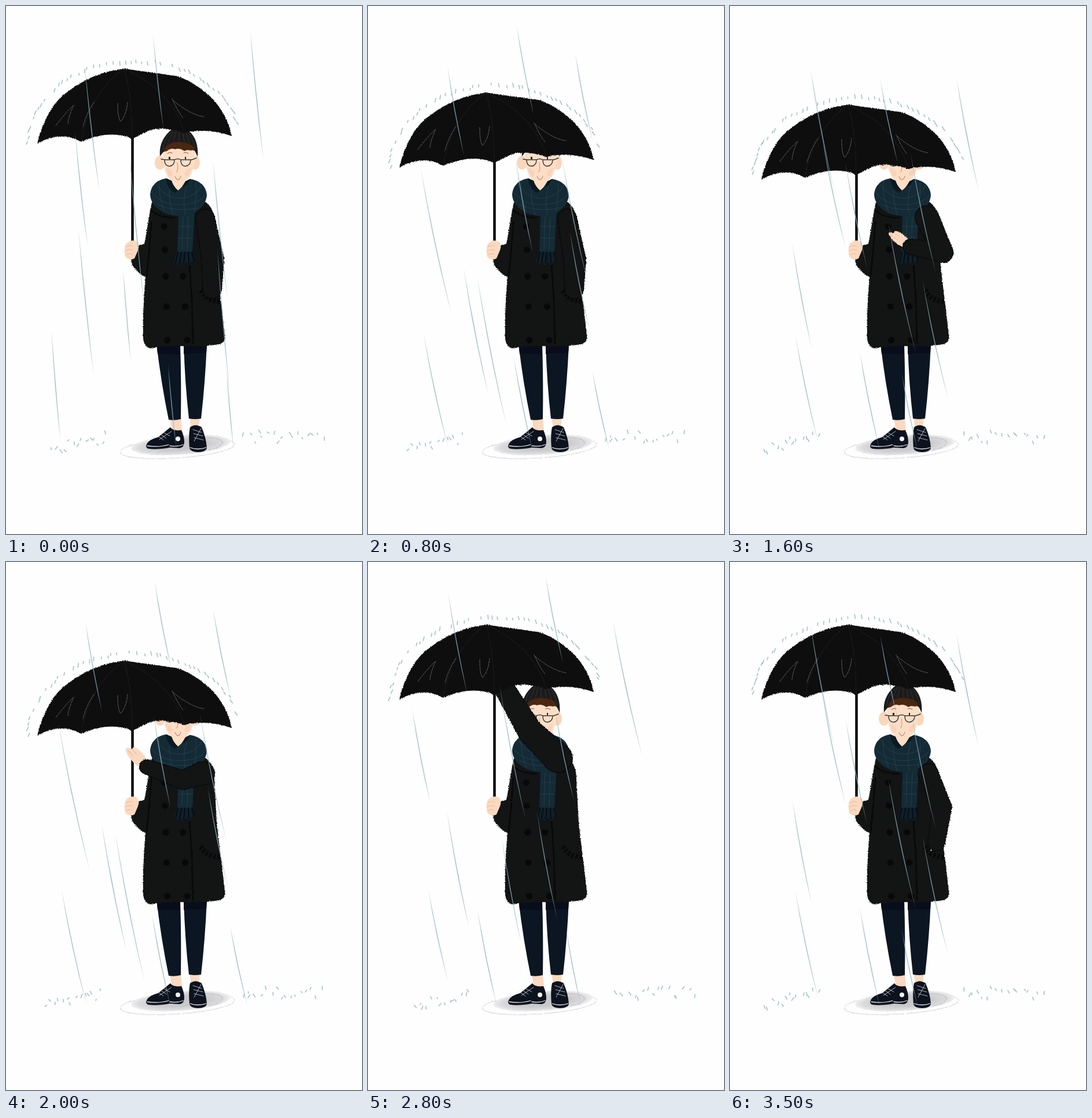
Animation of 615x910 px, one loop 3600 ms. Source, as an HTML page:

```html
<!DOCTYPE html>
<html lang="en">
<head>
<meta charset="utf-8">
<title>Umbrella in the rain</title>
<style>
html, body { margin: 0; width: 100%; height: 100%; overflow: hidden; background: #fefefe; }
svg { display: block; width: 100vw; height: 100vh; }
</style>
</head>
<body>
<svg viewBox="0 0 615 910" fill="none" stroke-linecap="round" stroke-linejoin="round">
  <defs>
    <filter id="rough" filterUnits="userSpaceOnUse" x="0" y="0" width="615" height="910" color-interpolation-filters="sRGB">
      <feTurbulence type="fractalNoise" baseFrequency=".5" numOctaves="2" seed="4"/>
      <feDisplacementMap in="SourceGraphic" scale="3" xChannelSelector="R" yChannelSelector="G"/>
      <feGaussianBlur stdDeviation=".5"/>
    </filter>
    <radialGradient id="wet">
      <stop offset=".5" stop-color="#c9c8ca"/>
      <stop offset=".85" stop-color="#dcdbdd"/>
      <stop offset="1" stop-color="#f0f0f1"/>
    </radialGradient>
  </defs>

  <g id="puddle" filter="url(#rough)">
    <g transform="rotate(-4 296 760)">
      <ellipse cx="296" cy="762" rx="99" ry="17" stroke="#dadadc" stroke-width="1.2"/>
      <ellipse cx="302" cy="757" rx="86" ry="17" fill="url(#wet)"/>
    </g>
    <path d="M345 744Q374 744 374 753Q372 762 350 765" stroke="#bebdc0"/>
  </g>

  <g id="legs">
    <path fill="#fad9c0" d="M282 708H302L304 732H287ZM317 708H335L333 729H320Z"/>
    <path fill="#0b1622" d="M260 582H301Q303 650 302 712Q291 715 281 713Q268 650 260 582ZM307 582H347Q344 650 337 711Q327 713 316 711Q309 650 307 582Z"/>
    <path fill="#090d1b" d="M260 582H301V601Q282 598 262 600ZM307 582H347L346 599Q327 597 307 600Z"/>
  </g>

  <g id="shoes">
    <path fill="#0c131e" d="M242 758Q244 748 263 743L284 726Q288 733 303 731Q308 742 308 751Q308 761 300 762L283 761Q262 765 246 763Q242 762 242 758Z"/>
    <path fill="#0c131e" d="M317 762Q315 740 318 726Q327 719 338 726Q346 745 347 762Q345 769 332 769Q319 769 317 762Z"/>
    <path stroke="#e4e5e6" stroke-width="1.3" d="M244 758Q265 761 281 756M283 758Q296 760 306 756M318 761Q331 766 346 761"/>
    <path stroke="#b9bfc4" stroke-width=".9" d="M262 741L272 748M267 738L277 745M272 735L283 741M265 747L286 733M323 730L338 735M324 737L340 741M325 744L341 748M337 728L325 750"/>
    <circle cx="297" cy="746" r="4" fill="#f4f4f4"/>
  </g>

  <path d="M218.500 215V432" stroke="#0f0f0f" stroke-width="4.600"/>

  <g id="head">
    <ellipse cx="266" cy="270" rx="9" ry="12" fill="#fad6bb"/>
    <ellipse cx="327" cy="270" rx="8" ry="12" fill="#fad6bb"/>
    <path fill="#fcdec6" d="M271 240H327Q328 270 322 284Q318 296 312 300V320H285V301Q277 294 274 280Q270 260 271 240Z"/>
    <path fill="#f8cbb0" opacity=".6" d="M276 279Q287 281 288 290Q285 296 281 293ZM320 279Q310 281 308 290Q313 296 316 291Z"/>
    <path fill="#4b2611" d="M270 252Q272 230 300 231Q328 231 328 252Q325 247 319 249Q312 247 308 250Q300 244 292 247Q285 244 278 250Z"/>
    <path fill="#1b1b1c" d="M266 259C264 236 275 222 287 212H312C326 222 333 238 331 260L325 247Q325 236 298 234Q274 236 273 250Z"/>
    <path stroke="#3a3a3c" stroke-width=".8" d="M271 248Q272 232 284 218M279 238L289 216M289 234L294 215M299 233V214M308 234L305 215M317 237L310 216M327 246Q324 230 316 219"/>
    <path stroke="#39393a" stroke-width="1.400" d="M268 264L275 265H291Q297 262 302 265H321L329 262M274 265Q274 276 283 276Q291 275 291 265M302 265Q302 276 310 276Q319 275 319 265"/>
    <path stroke="#8a5b42" d="M279 254Q283 251 287 253M307 253Q311 251 315 254"/>
    <path stroke="#eaa67f" stroke-width="1.500" d="M296 270Q298 282 295 286"/>
    <path stroke="#d5826a" stroke-width="1.200" d="M292 294Q296 301 298 299Q301 298 302 293"/>
    <path fill="#222" d="M281 260h3v4h-3zM309 260h2v4h-2z"/>
  </g>

  <g id="coat" filter="url(#rough)">
    <path fill="#131414" d="M252 338C247 360 244 385 239 410L230 412L216 428Q214 444 224 454Q233 464 241 467C238 500 236 540 237 572Q238 588 250 590Q275 586 300 586Q340 588 368 583Q380 580 378 568C374 530 370 500 364 450L360 375Q360 348 345 338L320 332H260Z"/>
    <path stroke="#080809" stroke-width="2.500" d="M250 352Q268 366 291 365M251 372Q248 420 243 466M317 446L321 505L323 582"/>
    <path stroke="#08080a" stroke-width="9" stroke-dasharray="4 3" stroke-linecap="butt" d="M337 490Q347 508 369 509"/>
    <g id="buttons" fill="#08080a"></g>
  </g>

  <g id="scarf">
    <path fill="#101f29" d="M297 352H326L322 424L327 442L321 439L317 447L311 441L305 447L301 440L296 445L290 441L296 420Z"/>
    <path fill="#142b36" d="M299 352H326L322 424H296Z"/>
    <path stroke="#060b10" stroke-width="1.800" d="M297 424L293 442M303 424L300 441M309 424L307 443M315 424L316 443M321 424L325 441"/>
    <path fill="#142b36" d="M277 297L286 302Q290 312 297 318Q304 313 310 303L318 298Q345 303 347 326Q345 347 322 358Q298 366 274 357Q249 344 249 324Q252 301 277 297Z"/>
    <path fill="#0a1922" d="M277 297L286 301Q289 311 297 318L292 322Q277 314 277 297ZM318 298L310 302L304 312Q314 310 318 298Z"/>
    <path stroke="#36525b" stroke-width=".8" opacity=".6" d="M252 322Q270 345 308 342Q335 340 345 325M260 307Q276 333 304 331Q330 328 338 309M262 342Q290 356 332 348M265 302Q262 325 274 354M312 310Q304 335 310 360M328 305Q330 330 325 354M282 317Q282 340 289 360M306 364L304 420M315 363L313 420M299 380H323M298 400H322"/>
  </g>

  <g id="arm" filter="url(#rough)"></g>

  <path fill="#fad9c0" d="M207 410Q214 402 225 405Q232 411 228 421L222 435Q213 440 206 432Q203 420 207 410Z"/>
  <path stroke="#eab997" d="M207 415Q214 411 219 414M206 422Q213 418 219 421M207 429Q213 425 218 428"/>

  <g id="canopy">
    <g filter="url(#rough)">
      <path fill="#0e0e0e" d="M54 237C63 200 82 164 105 149Q150 114 204 108L297 121C345 140 380 175 390 224Q345 209 308 219Q265 204 240 218L218 229Q180 212 130 234Q95 214 54 237Z"/>
      <path stroke="#171818" stroke-width="1.500" d="M204 108Q145 150 130 232M204 108Q217 150 218 227M204 108Q285 145 308 217"/>
    </g>
    <path stroke="#62686a" stroke-width=".9" stroke-dasharray="5 1.500" d="M86 206Q106 180 117 171Q108 190 107 203M152 166Q139 185 133 208M193 168Q193 194 198 199Q208 188 210 166M287 160Q298 184 306 193M289 163Q318 187 342 191"/>
  </g>

  <g id="rain" fill="#8db2bd" opacity=".8"></g>
  <path id="drops" stroke="#a6c6cb" stroke-width="1.700"/>
</svg>
<script>
const STEP_MS = 100, STEPS = 36, SHOWERS = 6, GROUND = 765;
const $ = id => document.getElementById(id);
const mix = (a, b, k) => a + (b - a) * k;
const clamp = k => Math.max(0, Math.min(1, k));
const mixAll = (a, b, k) => a.map((v, i) => mix(v, b[i], k));

function seeded(seed) {
  return () => {
    seed = (seed * 16807 + 11) % 2147483647;
    return seed / 2147483647;
  };
}

// The canopy sinks slowly, then is pushed back up.
const slipAt = step => 62 * (step < 20 ? clamp(step / 12) : clamp((27 - step) / 4));

// Joints are shoulder, elbow and wrist; radii belong to them in turn.
const pose = (joints, radii, hand) => [...joints, ...radii, hand];
const rest = () => pose([344, 366, 357, 438, 356, 488], [17, 20, 17], 0);
const akimbo = () => pose([341, 364, 375, 408, 357, 478], [19, 15, 14], .45);
const sweep = () => pose([340, 364, 368, 425, 312, 415], [21, 18, 14], .9);
const grip = () => pose([340, 364, 306, 376, 243, 353], [21, 17, 13], 1);
const push = slip => pose(
  [328, 338 + .38 * slip, 280 - .13 * slip, 292 + .64 * slip, 238 - .25 * slip, 222 + 1.1 * slip],
  [26, 22, 18], .9);
const timeline = [
  [0, rest], [9, rest], [12, akimbo], [16, sweep], [20, grip], [24, push],
  [28, push], [31, grip], [33, sweep], [34, akimbo], [36, rest]
];

function armAt(step) {
  const next = timeline.findIndex(([at]) => at > step);
  const [t0, from] = timeline[next - 1], [t1, to] = timeline[next];
  const slip = slipAt(step);
  return mixAll(from(slip), to(slip), (step - t0) / (t1 - t0));
}

function limb(x1, y1, r1, x2, y2, r2) {
  const a = Math.atan2(y2 - y1, x2 - x1) + Math.PI / 2, c = Math.cos(a), s = Math.sin(a);
  return `<path d="M${x1 + c * r1} ${y1 + s * r1}L${x2 + c * r2} ${y2 + s * r2}L${x2 - c * r2} ${y2 - s * r2}L${x1 - c * r1} ${y1 - s * r1}Z"/>`
    + `<circle cx="${x1}" cy="${y1}" r="${r1}"/><circle cx="${x2}" cy="${y2}" r="${r2}"/>`;
}

function armMarkup(step) {
  const [sx, sy, ex, ey, wx, wy, sr, er, wr, show] = armAt(step);
  const sleeve = grow => limb(sx, sy, sr + grow, ex, ey, er + grow) + limb(ex, ey, er + grow, wx, wy, wr + grow);
  const turn = Math.atan2(wy - ey, wx - ex) + .44;
  const reach = wr * .6 + 20 * show;
  const x = wx + Math.cos(turn) * reach, y = wy + Math.sin(turn) * reach;
  return `<g transform="translate(${x} ${y}) rotate(${turn * 180 / Math.PI}) scale(${show} ${show * (.5 + show / 2)})">`
    + '<path fill="#fad9c0" d="M-20 -9Q-4 -13 10 -9Q20 -6 20 -2Q17 2 12 3Q15 8 8 10Q-6 13 -20 9Z"/>'
    + '<path stroke="#eab997" d="M0 -4L15 -3M-1 3L11 4"/></g>'
    + `<g fill="#0b0b0c">${sleeve(0)}</g><g fill="#131414">${sleeve(-1.5)}</g>`;
}

function streak(x, y, length, lean) {
  const x2 = x + length * lean, y2 = y + length;
  const cx = x + length * lean * .4, cy = y + length / 2;
  return `<path d="M${x} ${y}Q${cx + 1.5} ${cy} ${x2} ${y2}Q${cx - 1.5} ${cy} ${x} ${y}Z"/>`;
}

// Four staggered rows of three streaks; the second shower falls almost straight.
function rainMarkup(shower) {
  const random = seeded(shower * 977 + 131);
  const lean = shower === 1 ? .08 : .18;
  let markup = '';
  for (let row = 0; row < 4; row++) {
    for (let col = 0; col < 3; col++) {
      const x = mix(75, 400, (col + random() * .9) / 3) + (row ? 0 : 60);
      const y = 20 + row * 175 + random() * 110;
      const length = Math.min(140 + random() * 120, GROUND - y);
      markup += streak(x, y, length, lean + random() * .04);
    }
  }
  return markup;
}

const dash = (x, y, dx, dy) => `M${x - dx} ${y - dy}L${x + dx} ${y + dy}`;

function canopyDrops(slip, random) {
  const count = 50;
  let d = '';
  for (let i = 0; i < count; i++) {
    const angle = Math.PI * mix(1, .07, (i + random() * .6) / count);
    const c = Math.cos(angle), lift = random() * 5, size = 1.6 + random() * 1.8;
    if (random() < .1) continue;
    d += dash(222 + (181 + lift) * c, 236 + slip - (138 + lift) * Math.sin(angle), (c + .25) * size * .6, size);
  }
  return d;
}

function scatter(from, to, count, slope, random) {
  let d = '';
  for (let i = 0; i < count; i++) {
    const k = (i + random()) / count;
    const y = 743 + slope * (1 - k) + (random() - .5) * 20;
    d += dash(mix(from, to, k), y, (random() - .5) * 4, 1 + random() * 2);
  }
  return d;
}

function groundDrops(random) {
  const left = 50 + random() * 35, right = 390 + random() * 40;
  return scatter(left, left + 100, 14, 20, random) + scatter(right, right + 145, 17, 0, random);
}

function draw(step) {
  const slip = slipAt(step);
  const shower = (step < 24 ? step + 1 : step) % SHOWERS;
  const random = seeded(shower * 613 + 71);
  $('canopy').setAttribute('transform', `translate(0 ${slip})`);
  $('arm').innerHTML = armMarkup(step);
  $('rain').innerHTML = rainMarkup(shower);
  $('drops').setAttribute('d', canopyDrops(slip, random) + groundDrops(random));
}

function buttons() {
  const button = (x, y) => `<circle cx="${x}" cy="${y}" r="5.5"/>`;
  let markup = '';
  for (let i = 0; i < 5; i++) {
    const y = 380 + 37 * i + 3 * i * i;
    markup += button(273 + 1.4 * i, y);
    if (i > 1) markup += button(299 + 3.5 * i, y);
  }
  return markup;
}

$('buttons').innerHTML = buttons();

let shown = -1;
const start = performance.now();
function tick() {
  const step = Math.floor((performance.now() - start) / STEP_MS) % STEPS;
  if (step !== shown) draw(shown = step);
  requestAnimationFrame(tick);
}
tick();
</script>
</body>
</html>
```
